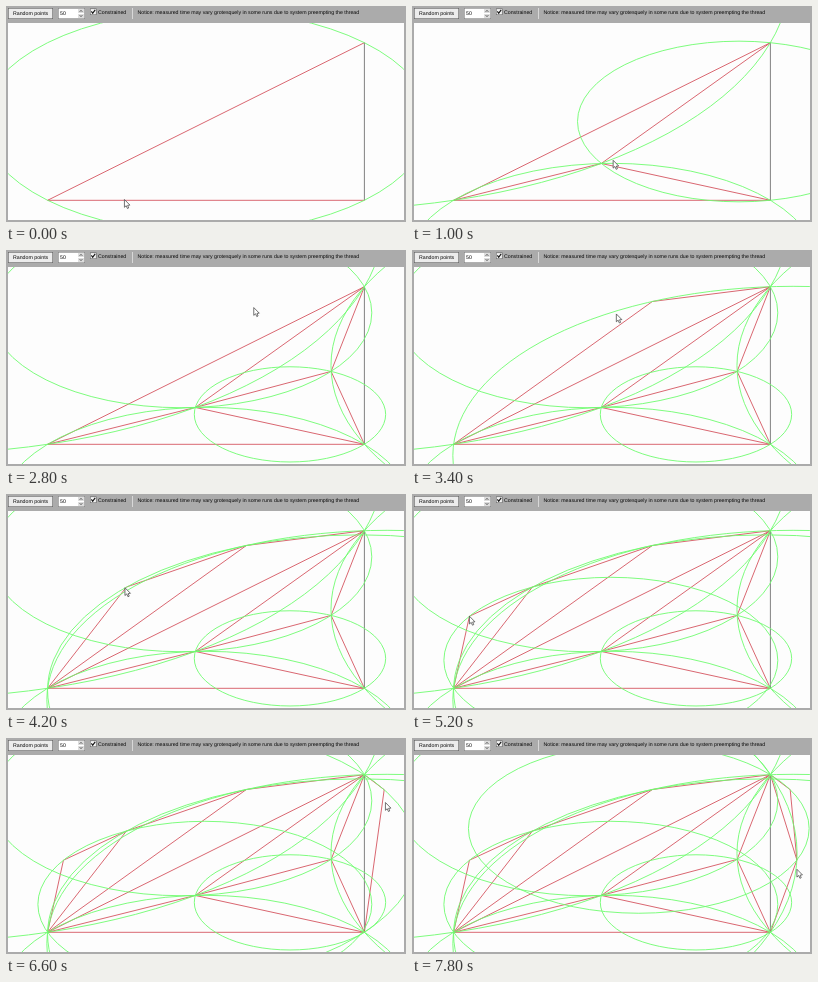
Recreate the animation shown at these times as an HTML page with a canvas. Size 400x216 px, loop 8 s.

```html
<!DOCTYPE html>
<html lang="en">
<head>
<meta charset="utf-8">
<title>Constrained triangulation</title>
<style>
html, body { margin: 0; width: 100%; height: 100%; overflow: hidden; background: #ababab; }
canvas { display: block; }
</style>
</head>
<body>
<canvas id="stage" width="400" height="216"></canvas>
<script>
const ctx = document.getElementById('stage').getContext('2d');
const LOOP = 8000, STEP = 200;
const FIRST_CLICK = 800, CLICK_GAP = 1100;
const panel = { x: 2, y: 17, w: 396, h: 197 };

// Points in the unit square: the constrained triangle, then one per click
const FIXED = 3;
const points = [
  [0.1, 0.9], [0.9, 0.9], [0.9, 0.1],
  [0.473, 0.713], [0.816, 0.53], [0.602, 0.175], [0.299, 0.386],
  [0.14, 0.534], [0.95, 0.176], [0.967, 0.533]
];
const pointerStops = [[0.294, 0.896], ...points.slice(FIXED), [0.967, 0.69]];

const toStage = ([u, v]) => [panel.x + u * panel.w, panel.y + v * panel.h];
const smooth = k => k * k * (3 - 2 * k);

function side(a, b, p) {
  return Math.sign((b[0] - a[0]) * (p[1] - a[1]) - (b[1] - a[1]) * (p[0] - a[0]));
}

function circumcircle(tri) {
  const [a, b, c] = tri.map(i => points[i]);
  const bx = b[0] - a[0], by = b[1] - a[1];
  const cx = c[0] - a[0], cy = c[1] - a[1];
  const d = 2 * (bx * cy - by * cx);
  const b2 = bx * bx + by * by, c2 = cx * cx + cy * cy;
  const x = (cy * b2 - by * c2) / d, y = (bx * c2 - cx * b2) / d;
  return { x: a[0] + x, y: a[1] + y, r: Math.hypot(x, y) };
}

function inCircle(tri, i) {
  const { x, y, r } = circumcircle(tri);
  return Math.hypot(points[i][0] - x, points[i][1] - y) < r;
}

// Each edge with the corners that face it
function edgesOf(mesh) {
  const edges = new Map();
  for (const tri of mesh)
    for (const apex of tri) {
      const ends = tri.filter(i => i !== apex).sort();
      const key = ends.join();
      if (!edges.has(key)) edges.set(key, { ends, apexes: [] });
      edges.get(key).apexes.push(apex);
    }
  return [...edges.values()];
}

function isOpposite({ ends: [a, b], apexes: [c] }, i) {
  const [pa, pb, pc, p] = [a, b, c, i].map(n => points[n]);
  return side(pa, pb, pc) !== side(pa, pb, p);
}

function insert(mesh, i) {
  const home = mesh.find(tri => !edgesOf([tri]).some(e => isOpposite(e, i)));
  const edges = home
    ? edgesOf([home])
    : edgesOf(mesh).filter(e => e.apexes.length === 1 && isOpposite(e, i));
  const added = edges.map(e => [...e.ends, i]);
  return legalise([...mesh.filter(tri => tri !== home), ...added]);
}

// Flip edges until every free one is Delaunay
function legalise(mesh) {
  const bad = edgesOf(mesh).find(({ ends, apexes: [p, q] }) =>
    q !== undefined && ends.some(i => i >= FIXED) && inCircle([...ends, p], q));
  if (!bad) return mesh;
  const { ends, apexes } = bad;
  const kept = mesh.filter(tri => !ends.every(i => tri.includes(i)));
  return legalise([...kept, ...ends.map(i => [...apexes, i])]);
}

const meshes = [[[0, 1, 2]]];
for (let i = FIXED; i < points.length; i++) meshes.push(insert(meshes[i - FIXED], i));

function pointerAt(t) {
  const first = t < FIRST_CLICK;
  const phase = first ? t / FIRST_CLICK : 1 + (t - FIRST_CLICK) / CLICK_GAP;
  const i = Math.floor(phase), k = smooth(phase - i);
  const [from, to] = [pointerStops[i], pointerStops[i + 1]];
  return toStage(from.map((v, n) => v + (to[n] - v) * k));
}

function box(x, y, w, h, fill, stroke) {
  ctx.fillStyle = stroke;
  ctx.fillRect(x, y, w, h);
  ctx.fillStyle = fill;
  ctx.fillRect(x + 0.6, y + 0.6, w - 1.2, h - 1.2);
}

function label(text, x, y) {
  ctx.fillStyle = '#080808';
  ctx.fillText(text, x, y);
}

function line(list, color, width) {
  ctx.beginPath();
  list.forEach(p => ctx.lineTo(...p));
  ctx.strokeStyle = color;
  ctx.lineWidth = width;
  ctx.stroke();
}

function chevron(x, y, rise) {
  line([[x - 1.4, y], [x, y - rise], [x + 1.4, y]], '#444', 0.8);
}

function drawToolbar() {
  ctx.font = '5.24px "Liberation Sans", Arial, sans-serif';
  ctx.textRendering = 'geometricPrecision';
  box(2, 2, 45, 11, '#ececec', '#5c5c5c');
  label('Random points', 7, 9.2);
  box(52, 2, 27, 11, '#ffffff', '#7c7c7c');
  label('50', 54, 9.2);
  ctx.fillStyle = '#dedede';
  ctx.fillRect(72, 3, 6, 4);
  ctx.fillRect(72, 8, 6, 4);
  chevron(75, 5.9, 1.6);
  chevron(75, 9.1, -1.6);
  box(84, 2.5, 6.5, 6.5, '#f6f6f6', '#666666');
  line([[85.4, 5.4], [86.7, 7.2], [89.2, 3.8]], '#111', 1.1);
  label('Constrained', 92, 7.5);
  ctx.fillStyle = '#d8d8d8';
  ctx.fillRect(126, 2, 1, 11);
  label('Notice: measured time may vary grotesquely in some runs due to system preempting the thread', 131.5, 7.5);
}

function drawMesh(mesh) {
  for (const { ends } of edgesOf(mesh)) {
    const color = ends.join() === '1,2' ? '#6c6c6c' : '#d24c58';
    line(ends.map(i => toStage(points[i])), color, 0.85);
  }
  ctx.strokeStyle = '#70fc70';
  ctx.lineWidth = 0.9;
  for (const tri of mesh) {
    const { x, y, r } = circumcircle(tri);
    ctx.beginPath();
    ctx.ellipse(...toStage([x, y]), r * panel.w, r * panel.h, 0, 0, 2 * Math.PI);
    ctx.stroke();
  }
}

function drawPointer([x, y]) {
  ctx.save();
  ctx.translate(x, y);
  ctx.beginPath();
  [[0, 0], [0, 7.8], [1.8, 6.2], [3, 9], [4.3, 8.4], [3.2, 5.8], [5.5, 5.6]]
    .forEach(p => ctx.lineTo(...p));
  ctx.closePath();
  ctx.fillStyle = '#fff';
  ctx.fill();
  ctx.strokeStyle = '#444';
  ctx.lineWidth = 0.75;
  ctx.stroke();
  ctx.restore();
}

function draw(t) {
  const { x, y, w, h } = panel;
  const clicks = Math.max(0, Math.floor((t - FIRST_CLICK) / CLICK_GAP) + 1);
  ctx.fillStyle = '#ababab';
  ctx.fillRect(0, 0, 400, 216);
  drawToolbar();
  ctx.save();
  ctx.beginPath();
  ctx.rect(x, y, w, h);
  ctx.clip();
  ctx.fillStyle = '#fdfdfd';
  ctx.fillRect(x, y, w, h);
  drawMesh(meshes[clicks]);
  drawPointer(pointerAt(t));
  ctx.restore();
}

const start = performance.now();
function tick() {
  const t = (performance.now() - start) % LOOP;
  draw(Math.floor(t / STEP) * STEP);
  requestAnimationFrame(tick);
}
tick();
</script>
</body>
</html>
```
